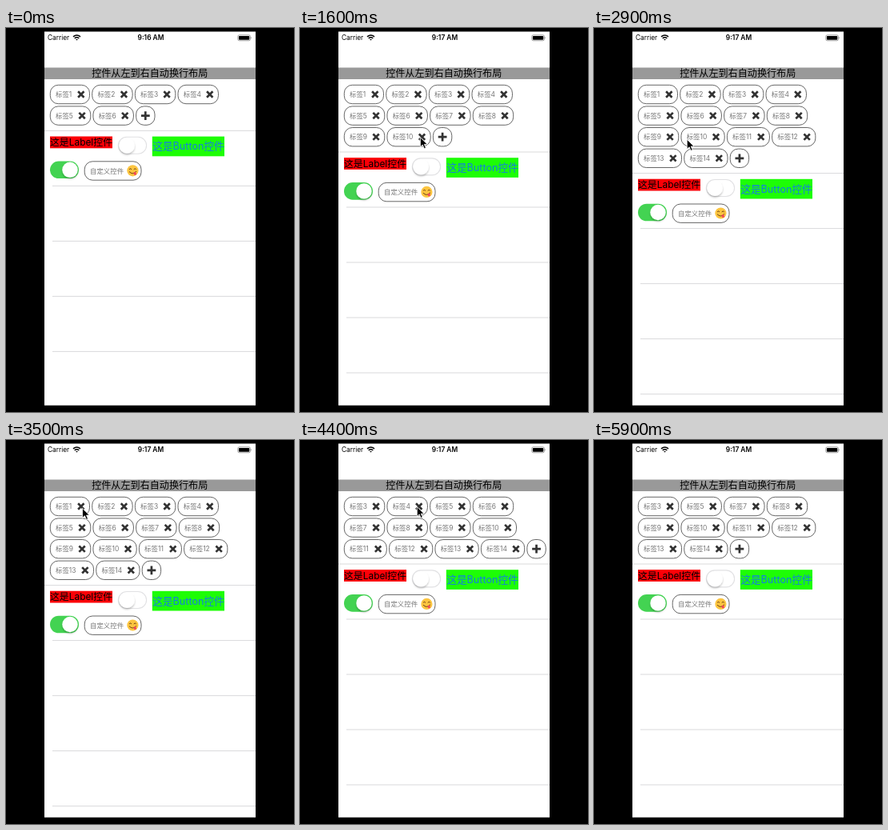
Animation of 360x480 px, one loop 6 s. Source, as an HTML page:

```html
<!DOCTYPE html>
<html lang="zh-CN">
<head>
<meta charset="utf-8">
<title>自动换行布局</title>
<style>
  html, body { margin: 0; width: 100%; height: 100%; overflow: hidden; background: #000; }
  svg { display: block; width: 360px; height: 480px; }
  text { font-family: Inter, "Noto Sans CJK SC", "Noto Sans CJK", sans-serif; font-size: 8.45px; }
  .pill { fill: #fff; stroke: #404040; stroke-width: .8; }
  .small { fill: #777; }
  .mark { fill: none; stroke: #333; stroke-width: 2.7; }
  .mid { text-anchor: middle; }
  .line { stroke: #d0d0d2; stroke-width: .8; }
</style>
</head>
<body>
<svg viewBox="0 0 360 480">
  <defs>
    <clipPath id="screen"><rect x="48" y="4.5" width="264" height="467.3"/></clipPath>
    <filter id="soft" x="-40%" y="-40%" width="180%" height="200%">
      <feDropShadow dx="0" dy="1.8" stdDeviation="1.3" flood-opacity=".25"/>
    </filter>
  </defs>
  <g clip-path="url(#screen)">
    <rect x="48" y="4" width="264" height="469" fill="#fff"/>

    <text x="52" y="15" style="font-size:8.3px">Carrier</text>
    <path d="M84 10.9Q88.5 7.2 93 10.9M85.7 12.8Q88.5 10.6 91.3 12.8" fill="none" stroke="#000" stroke-width="1.5"/>
    <path d="M87 13.9h3l-1.5 1.7z"/>
    <text id="clock" class="mid" x="181" y="15" style="font-size:8.4px;font-weight:600"></text>
    <rect x="289.8" y="8.8" width="15.6" height="7" rx="1.8" fill="none" stroke="#777" stroke-width=".7"/>
    <rect x="290.9" y="9.9" width="13.4" height="4.8" rx=".9"/>
    <path d="M306.3 11q1.5 1.3 0 2.6z" fill="#777"/>

    <rect x="48" y="49.5" width="264" height="14.5" fill="#999"/>
    <text class="mid" x="179.7" y="61" style="font-size:12.1px">控件从左到右自动换行布局</text>

    <g id="tags"></g>

    <g id="lower">
      <rect x="55" y="135.5" width="78" height="14.8" fill="#fb0007"/>
      <text class="mid" x="94" y="147.2" style="font-size:11.9px">这是Label控件</text>

      <rect x="140.4" y="136.3" width="35.2" height="21" rx="10.5" fill="#fff" stroke="#e1e1e3" stroke-width="1.1"/>
      <circle cx="151.2" cy="147" r="9.7" fill="#fff" filter="url(#soft)"/>

      <rect x="182.8" y="135.6" width="90.2" height="24.7" fill="#1dfd05"/>
      <text class="mid" x="228" y="152.4" fill="#147ce4" style="font-size:12.6px">这是Button控件</text>

      <rect x="55" y="166.5" width="36" height="21.6" rx="10.8" fill="#43d352"/>
      <circle cx="80" cy="177.3" r="9.7" fill="#fff" filter="url(#soft)"/>

      <rect class="pill" x="98.2" y="166.8" width="70.8" height="23.4" rx="10"/>
      <text class="small" x="105" y="181.6">自定义控件</text>
      <g transform="translate(158.4 178.3)" fill="none" stroke="#6b3d12">
        <circle r="7.1" fill="#fcc540" stroke="none"/>
        <path d="M-4.4-1.5q1.5-2.2 3 0M1.4-1.5q1.5-2.2 3 0M-4.4 1.2Q0 6 4.6 .8"/>
        <ellipse cx="2.8" cy="3.6" rx="1.6" ry="2" fill="#f2485a" stroke="none" transform="rotate(-25 2.8 3.6)"/>
      </g>
    </g>

    <path id="cursor" d="M0 0V12L2.9 9.4L4.9 14L7 13.1L5 8.7H8.8z" stroke="#fff" stroke-width=".8"/>
  </g>
</svg>
<script>
const LOOP = 6000, STEP = 100, RESIZE = 300;
const LEFT = 55, TOP = 71, RIGHT = 309, GAP = 2.6, PITCH = 26.6, PLUS = 24;
const CELL = { top: 128.4, height: 69, count: 5 };
const DOOR = { x: 305, y: 98 };  // where the pointer enters and leaves
const $ = id => document.getElementById(id);

// Clicks as [time, tag]: positive adds a tag, negative removes it
const clicks = [
  [600, 7], [920, 8], [1100, 9], [1450, 10], [1750, 11], [1950, 12],
  [2175, 13], [2500, 14], [3600, -1], [3850, -2], [4500, -4], [5000, -6]
];

const clamp = p => Math.min(1, Math.max(0, p));
const ease = p => (p = clamp(p), p * p * (3 - 2 * p));
const mix = (a, b, p) => a + (b - a) * p;
const tagWidth = n => [...String(n)].reduce((w, d) => w + (d === "1" ? 3.8 : 5.05), 46);

function addPill(width, inner) {
  const g = document.createElementNS("http://www.w3.org/2000/svg", "g");
  g.innerHTML = `<rect class="pill" x=".3" y=".3" width="${width - .6}" height="23.4" rx="10"/>${inner}`;
  $("tags").append(g);
  return { g, width };
}

// Pill 0 is the plus button, pill n is tag n
const pills = Array.from({ length: 15 }, (_, n) => {
  if (!n) return addPill(PLUS, '<path class="mark" d="M6.6 12h10.8M12 6.6v10.8"/>');
  const w = tagWidth(n), x = w - 11;
  return addPill(w, `<text class="small" x="7" y="15">标签${n}</text>
    <path class="mark" d="M${x - 3.7} 8.3l7.4 7.4m0-7.4l-7.4 7.4"/>`);
});

for (let i = 0; i < CELL.count; i++) {
  const y = CELL.top + i * CELL.height;
  $("lower").insertAdjacentHTML("afterbegin", `<path class="line" d="M${i ? 58 : 48} ${y}H312"/>`);
}

// Left to right, wrapping when a pill no longer fits
function flow(tags) {
  let x = LEFT, row = 0;
  const spots = new Map();
  for (const n of [...tags, 0]) {
    const { width } = pills[n];
    if (x + width > RIGHT) { x = LEFT; row++; }
    spots.set(n, { x, y: TOP + row * PITCH });
    x += width + GAP;
  }
  return { tags, spots, row };
}

// Each click starts a new layout and gives the pointer a place to be
const layouts = [{ at: 0, ...flow([1, 2, 3, 4, 5, 6]) }];
const stops = [{ at: 200, ...DOOR }];
for (const [at, n] of clicks) {
  const { tags, spots } = layouts.at(-1);
  const hit = n > 0 ? 0 : -n, { x, y } = spots.get(hit);
  stops.push({ at, x: x + pills[hit].width - (hit ? 10 : 11), y: y + 12.5 });
  layouts.push({ at, ...flow(n > 0 ? [...tags, n] : tags.filter(k => k !== hit)) });
}
stops.push({ at: 5400, ...DOOR });

function pointerAt(t) {
  const i = stops.findIndex(s => s.at > t);
  if (i < 1) return null;
  const a = stops[i - 1], b = stops[i], p = ease((t - a.at) / (b.at - a.at));
  return [mix(a.x, b.x, p), mix(a.y, b.y, p)];
}

function draw(t) {
  const { spots } = layouts.findLast(l => l.at <= t);
  pills.forEach(({ g }, n) => {
    const s = spots.get(n);
    g.setAttribute("visibility", s ? "visible" : "hidden");
    if (s) g.setAttribute("transform", `translate(${s.x} ${s.y})`);
  });

  const row = layouts.reduce((r, l) => mix(r, l.row, ease((t - l.at) / RESIZE)), 1);
  $("lower").setAttribute("transform", `translate(0 ${(row - 1) * PITCH})`);
  $("clock").textContent = t < 400 ? "9:16 AM" : "9:17 AM";

  const tip = pointerAt(t);
  $("cursor").setAttribute("visibility", tip ? "visible" : "hidden");
  if (tip) $("cursor").setAttribute("transform", `translate(${tip})`);
}

let shown = -1;
function tick() {
  const t = Math.floor(performance.now() % LOOP / STEP) * STEP;
  if (t !== shown) draw(shown = t);
  requestAnimationFrame(tick);
}
tick();
</script>
</body>
</html>
```
